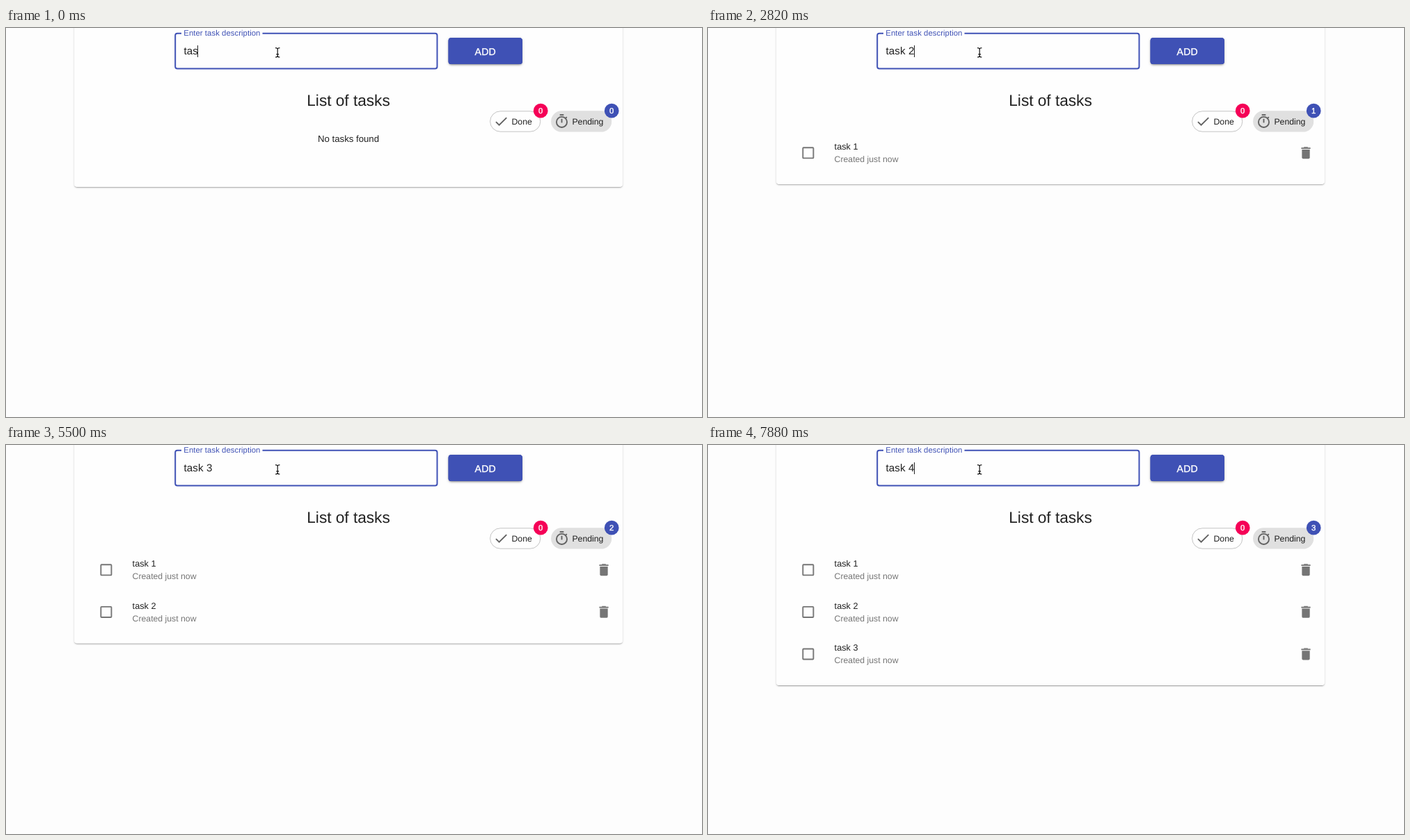
These frames come from a looping animation (1000 by 560 pixels, 8000 ms). An HTML page with a canvas:

```html
<!DOCTYPE html>
<html lang="en">
<head>
<meta charset="utf-8">
<title>Task list</title>
<style>
  html, body { margin: 0; width: 100%; height: 100%; overflow: hidden; background: #fdfdfd; }
  canvas { display: block; }
</style>
</head>
<body>
<canvas id="stage" width="1000" height="560"></canvas>
<script>
const ctx = document.getElementById('stage').getContext('2d');
const LOOP = 8000;
const TICK = 148.8;
const BLINK_TICKS = 3;
const SCALE = 0.943;
const ROW_PITCH = 60.6;
const FAMILY = '"Liberation Sans", Arial, sans-serif';
const PAPER = '#fefefe', INDIGO = '#3f51b5', PINK = '#f50057';
const INK = 'rgba(0,0,0,.87)', MUTED = 'rgba(0,0,0,.54)', CHIP_ICON = '#616161';

// Keystrokes in order: a dot waits one tick, a line break adds the task.
const KEYS = 'tas.k. ..1...\n' +
  '....t..a.s.k... .2...\n' +
  '...t..a..sk... ..3.....\n' +
  '....t..a.s.k... ...4';

function stateAt(time) {
  const now = Math.floor(time / TICK + 0.13);
  let tick = 0, lastEdit = 0, typed = '', count = 0;
  for (const key of KEYS) {
    if (key === '.') {
      if (++tick > now) break;
      continue;
    }
    lastEdit = tick;
    if (key === '\n') {
      typed = '';
      count++;
    } else {
      typed += key;
    }
  }
  const caretOn = Math.floor((now - lastEdit) / BLINK_TICKS) % 2 === 0;
  return { typed, count, caretOn };
}

function text(str, x, y, size, { color = INK, align = 'left', spacing = 0, heavy = 0 } = {}) {
  ctx.font = `${size}px ${FAMILY}`;
  ctx.letterSpacing = `${spacing}px`;
  ctx.textAlign = align;
  ctx.fillStyle = color;
  ctx.fillText(str, x, y);
  if (heavy) {
    ctx.strokeStyle = color;
    ctx.lineWidth = heavy;
    ctx.strokeText(str, x, y);
  }
}

function roundBox(x, y, w, h, r, fill) {
  ctx.beginPath();
  ctx.roundRect(x, y, w, h, r);
  if (fill) {
    ctx.fillStyle = fill;
    ctx.fill();
  }
}

function stroke(color, width) {
  ctx.strokeStyle = color;
  ctx.lineWidth = width;
  ctx.stroke();
}

// Icons live on a 24-unit grid.
const ICONS = {
  check(color) {
    ctx.beginPath();
    ctx.moveTo(4.1, 12.7);
    ctx.lineTo(9, 17.6);
    ctx.lineTo(20.3, 6.3);
    stroke(color, 2);
  },
  timer(color) {
    ctx.beginPath();
    ctx.arc(12, 13, 8, 0, Math.PI * 2);
    ctx.moveTo(18, 7);
    ctx.lineTo(19.7, 5.3);
    stroke(color, 2);
    ctx.fillRect(9, 1, 6, 2);
    ctx.fillRect(11, 8, 2, 6);
  },
  box(color) {
    roundBox(4, 4, 16, 16, 1);
    stroke(color, 2);
  },
  trash(color) {
    roundBox(6, 7, 12, 14, [0, 0, 2, 2], color);
    ctx.fillRect(5, 4, 14, 2);
    ctx.fillRect(9, 3, 6, 1);
  }
};

function icon(name, centerX, centerY, color) {
  ctx.save();
  ctx.translate(centerX, centerY);
  ctx.scale(SCALE, SCALE);
  ctx.translate(-12, -12);
  ctx.fillStyle = color;
  ICONS[name](color);
  ctx.restore();
}

// Material elevation: ambient, penumbra and umbra shadows.
function raised(x, y, w, h, fill, level) {
  const layers = [
    { dy: 1, blur: 1 + 2 * level, spread: 0, alpha: 0.2 },
    { dy: level, blur: level, spread: 0, alpha: 0.14 },
    { dy: level + 1, blur: 1, spread: -level, alpha: 0.12 }
  ];
  ctx.save();
  for (const { dy, blur, spread, alpha } of layers) {
    ctx.shadowColor = `rgba(0,0,0,${alpha})`;
    ctx.shadowOffsetY = dy * SCALE;
    ctx.shadowBlur = blur * SCALE;
    const s = spread * SCALE;
    roundBox(x - s, y - s, w + 2 * s, h + 2 * s, 3.8, fill);
  }
  ctx.restore();
  roundBox(x, y, w, h, 3.8, fill);
}

function badge(x, count, color) {
  ctx.beginPath();
  ctx.arc(x, 119.2, 11 * SCALE, 0, Math.PI * 2);
  ctx.fillStyle = color;
  ctx.fill();
  text(String(count), x, 123.2, 11.3, { color: '#fff', align: 'center', heavy: 0.4 });
}

function drawInput(typed, caretOn) {
  roundBox(243.2, 7.7, 376.3, 50.8, 3);
  stroke(INDIGO, 2);
  ctx.fillStyle = PAPER;
  ctx.fillRect(252, 5, 116.5, 6);
  text('Enter task description', 255.3, 10.8, 11.3, { color: INDIGO, spacing: 0.07 });
  text(typed, 255.4, 38.4, 15.1, { spacing: 0.14 });
  if (caretOn) {
    ctx.fillStyle = INK;
    ctx.fillRect(Math.floor(255.4 + ctx.measureText(typed).width), 25, 1, 17);
  }
}

function drawPointer() {
  const x = 390.2;
  ctx.beginPath();
  for (const [end, inner] of [[28.6, 30.5], [42, 40]]) {
    ctx.moveTo(x - 3.2, end);
    ctx.quadraticCurveTo(x, end, x, inner);
    ctx.quadraticCurveTo(x, end, x + 3.2, end);
  }
  ctx.moveTo(x, 30);
  ctx.lineTo(x, 41);
  ctx.moveTo(x - 1.9, 37.8);
  ctx.lineTo(x + 1.9, 37.8);
  stroke('#111', 1.2);
}

function drawChips(pending) {
  roundBox(695.6, 119.8, 72.2, 29.4, 14.7);
  stroke('rgba(0,0,0,.23)', 1);
  icon('check', 711.4, 134.5, CHIP_ICON);
  text('Done', 726.5, 139, 12.26);

  roundBox(783.1, 119.3, 87.1, 30.3, 15.1, '#e0e0e0');
  icon('timer', 798.5, 134.5, CHIP_ICON);
  text('Pending', 813.4, 139, 12.26);

  badge(768.2, 0, PINK);
  badge(870.2, pending, INDIGO);
}

function drawTask(index) {
  const dy = index * ROW_PITCH;
  icon('box', 143.9, 179.8 + dy, MUTED);
  text(`task ${index + 1}`, 181.6, 175.2 + dy, 12.7);
  text('Created just now', 181.6, 193.2 + dy, 12.26, { color: MUTED });
  icon('trash', 859, 179.7 + dy, MUTED);
}

function draw(time) {
  const { typed, count, caretOn } = stateAt(time);
  const bottom = count ? 224.9 + (count - 1) * ROW_PITCH : 228.8;

  ctx.fillStyle = '#fdfdfd';
  ctx.fillRect(0, 0, 1000, 560);
  raised(98.3, -50, 787.4, bottom + 50, PAPER, 1);

  drawInput(typed, caretOn);
  drawPointer();
  raised(635.7, 14.2, 106.1, 37.8, INDIGO, 2);
  text('ADD', 688.8, 38.8, 14.15, { color: '#fff', align: 'center', spacing: 0.2, heavy: 0.35 });

  text('List of tasks', 492, 111.7, 22.63, { align: 'center' });
  drawChips(count);
  if (!count) text('No tasks found', 492, 164, 13.2, { align: 'center' });
  for (let i = 0; i < count; i++) drawTask(i);
}

ctx.textRendering = 'geometricPrecision';
const start = performance.now();
function tick() {
  draw((performance.now() - start) % LOOP);
  requestAnimationFrame(tick);
}
tick();
</script>
</body>
</html>
```
